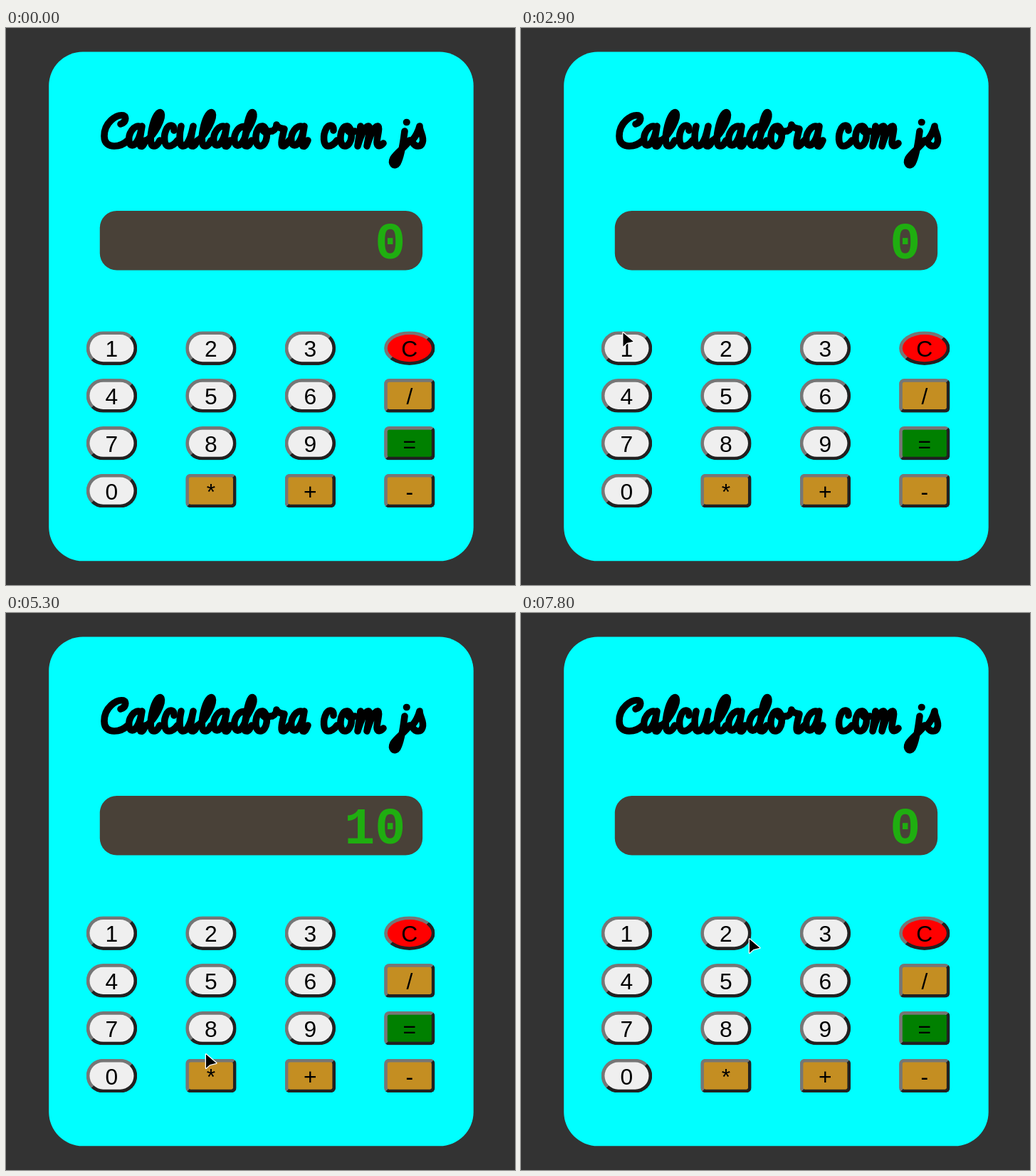
Write an HTML page that moves like this. It is 715 px wide and 783 px high and loops after 8 s.

```html
<!DOCTYPE html>
<html lang="pt">
<head>
<meta charset="utf-8">
<title>Calculadora com js</title>
<style>
  html, body { margin: 0; width: 100%; height: 100%; overflow: hidden; background: #333; }
  #panel, #screen, .key { position: absolute; left: 0; top: 0; box-sizing: border-box; transform-origin: 0 0; }
  #panel { width: 250px; height: 300px; border-radius: 20px; background: #0ff; transform: translate(60.2px, 33.5px) scale(2.386); }
  #screen {
    width: 190px; height: 35px; padding-right: 10px; border-radius: 10px; background: #494138;
    color: #1fae10; font: bold 30px/40px "Liberation Mono", monospace; text-align: right;
    transform: translate(131.8px, 257px) scale(2.386);
  }
  .key {
    width: 30px; height: 20px; border: 2px solid; border-color: #767676 #212121 #212121 #767676;
    border-radius: 10px; background: #efefef; color: #000;
    font: 13.333px/17px "Liberation Sans", Arial, sans-serif; text-align: center;
  }
  .op { border-radius: 3px; background: #c48e22; }
  .clear { border-radius: 50%; background: #f00; }
  .equal { border-radius: 3px; background: #008000; }
  .hover { background: #1c1c9f; color: #efefef; }
  .down { border-color: #212121 #767676 #767676 #212121; }
  svg { position: absolute; left: 0; top: 0; }
  #title { fill: none; stroke: #000; stroke-width: 9.6; stroke-linecap: round; stroke-linejoin: round; }
</style>
</head>
<body>
<div id="panel"></div>
<div id="screen">0</div>
<svg id="overlay" width="715" height="783" viewBox="0 0 715 783">
  <g id="title" role="img" aria-label="Calculadora com js"></g>
</svg>
<svg id="pointer" width="20" height="26" viewBox="0 0 20 26">
  <path d="M2 2.5V21.7L7.4 16.9 16.3 14.8Z" fill="#000" stroke="#fff" stroke-width="2.6" stroke-linejoin="round" paint-order="stroke"/>
</svg>
<script>
const LOOP = 8000, STEP = 50, SCALE = 2.386;
const screenEl = document.getElementById('screen');
const pointer = document.getElementById('pointer');

// Script lettering: advance width and pen strokes, baseline at y = 0
const glyphs = {
  C: [35, 'M28-36C35-38 37-46 32-48C22-50 5-38 5-19C5-8 12-5 19-5C27-5 34-9 38-13'],
  a: [29, 'M22-32C12-37 3-22 5-11C8 0 18-8 22-28M23-33C21-20 18-8 21-5C24-4 26-8 28-13'],
  l: [18, 'M2-14C12-22 24-44 21-51C18-56 12-46 9-34C5-18 5-5 11-5C15-5 17-9 19-13'],
  c: [25, 'M21-27C22-35 15-36 11-30C6-21 6-5 14-5C19-5 23-9 26-13'],
  u: [29, 'M6-33C3-20 3-5 9-5C15-5 20-18 23-33C20-18 17-5 22-5C25-5 27-9 29-13'],
  d: [29, 'M22-31C12-37 3-22 5-11C8 0 18-8 22-25C29-36 34-48 31-52C27-55 23-40 21-24C18-10 18-5 22-5C25-5 27-9 29-13'],
  o: [27, 'M15-33C5-34 2-5 12-5C22-5 25-28 16-33C14-24 21-22 26-26'],
  r: [24, 'M2-26C6-28 8-32 8-35C10-30 15-30 19-29C16-18 13-5 17-5C20-5 23-9 26-13'],
  m: [44, 'M7-33L3-5C8-22 14-34 18-33C22-32 18-18 16-5C21-22 27-34 31-33C35-32 30-18 30-10C30-4 35-4 39-9'],
  j: [18, 'M11-26C9-10 6 10 1 19C-3 25-9 20-5 12C0 4 12-4 18-13M13.5-38.5h.5'],
  s: [24, 'M1-11C8-16 13-28 14-33C14-25 21-18 18-10C16-3 8-4 5-9'],
  ' ': [14, '']
};
let penX = 133, lettering = '';
for (const ch of 'Calculadora com js') {
  const [width, d] = glyphs[ch];
  lettering += `<path transform="translate(${penX} 171)" d="${d}"/>`;
  penX += width;
}
document.getElementById('title').innerHTML = lettering;

const kinds = { C: 'clear', '=': 'equal', '/': 'op', '*': 'op', '+': 'op', '-': 'op' };
const keys = [...'123C456/789=0*+-'].map((label, i) => {
  const x = 112.7 + 139.45 * (i % 4), y = 426.2 + 66.85 * Math.floor(i / 4);
  const el = document.createElement('div');
  const kind = kinds[label] || '';
  el.textContent = label;
  el.style.transform = `translate(${x}px, ${y}px) scale(${SCALE})`;
  document.body.insertBefore(el, pointer);
  return { el, kind, label, cx: x + 15 * SCALE, cy: y + 10 * SCALE };
});

// Inner face of a key: pill for digits, box for the others
function hit(key, x, y) {
  const dx = Math.abs(x - key.cx), dy = Math.abs(y - key.cy);
  const w = 13 * SCALE, h = 8 * SCALE;
  if (key.kind) return dx < w && dy < h;
  return Math.hypot(Math.max(0, dx - (w - h)), dy) < h;
}

// Pointer path: time, x, y
const path = [
  [200, 50, -26], [900, 62.6, 43.5], [1050, 62.6, 43.5], [1100, 63, 44], [1600, 63, 44],
  [2350, 118, 276.5], [2450, 125, 309], [3100, 144, 446], [3550, 144, 446],
  [3600, 144, 465], [4400, 144, 640], [4450, 144, 641], [5100, 144, 641],
  [5300, 279, 618], [5950, 477, 549], [6250, 527, 530.5], [6500, 560, 515],
  [7150, 560, 515], [7800, 319, 456], [8000, 319, 456]
];
const slope = (i, k) => (path[i + 1][k] - path[i][k]) / (path[i + 1][0] - path[i][0]);
function tangent(i, k) {
  if (i === 0 || i === path.length - 1) return 0;
  const a = slope(i - 1, k), b = slope(i, k);
  return a * b > 0 ? 2 * a * b / (a + b) : 0;
}
function along(t, k) {
  if (t <= path[0][0]) return path[0][k];
  let i = 0;
  while (i < path.length - 2 && t >= path[i + 1][0]) i++;
  const h = path[i + 1][0] - path[i][0], u = (t - path[i][0]) / h;
  const ease = u * u * (3 - 2 * u);
  return path[i][k] * (1 - ease) + path[i + 1][k] * ease
    + h * u * (1 - u) * ((1 - u) * tangent(i, k) - u * tangent(i + 1, k));
}

// Clicks: press time, release time, key, reading afterwards
const clicks = [[3350, 3450, '1', '1'], [4650, 4750, '0', '10'], [6850, 6900, '/', '0']];

function draw(now) {
  const t = Math.floor((now % LOOP) / STEP) * STEP;
  const x = along(t, 1), y = along(t, 2);
  pointer.style.transform = `translate(${x}px, ${y}px)`;
  let reading = '0', held = '';
  for (const [press, release, label, result] of clicks) {
    if (t >= release) reading = result;
    else if (t >= press) held = label;
  }
  screenEl.textContent = reading;
  for (const key of keys) {
    key.el.className = ['key', key.kind, hit(key, x + 1.5, y + 1.5) ? 'hover' : '', key.label === held ? 'down' : ''].join(' ');
  }
}

function frame() {
  draw(performance.now());
  requestAnimationFrame(frame);
}
frame();
</script>
</body>
</html>
```
